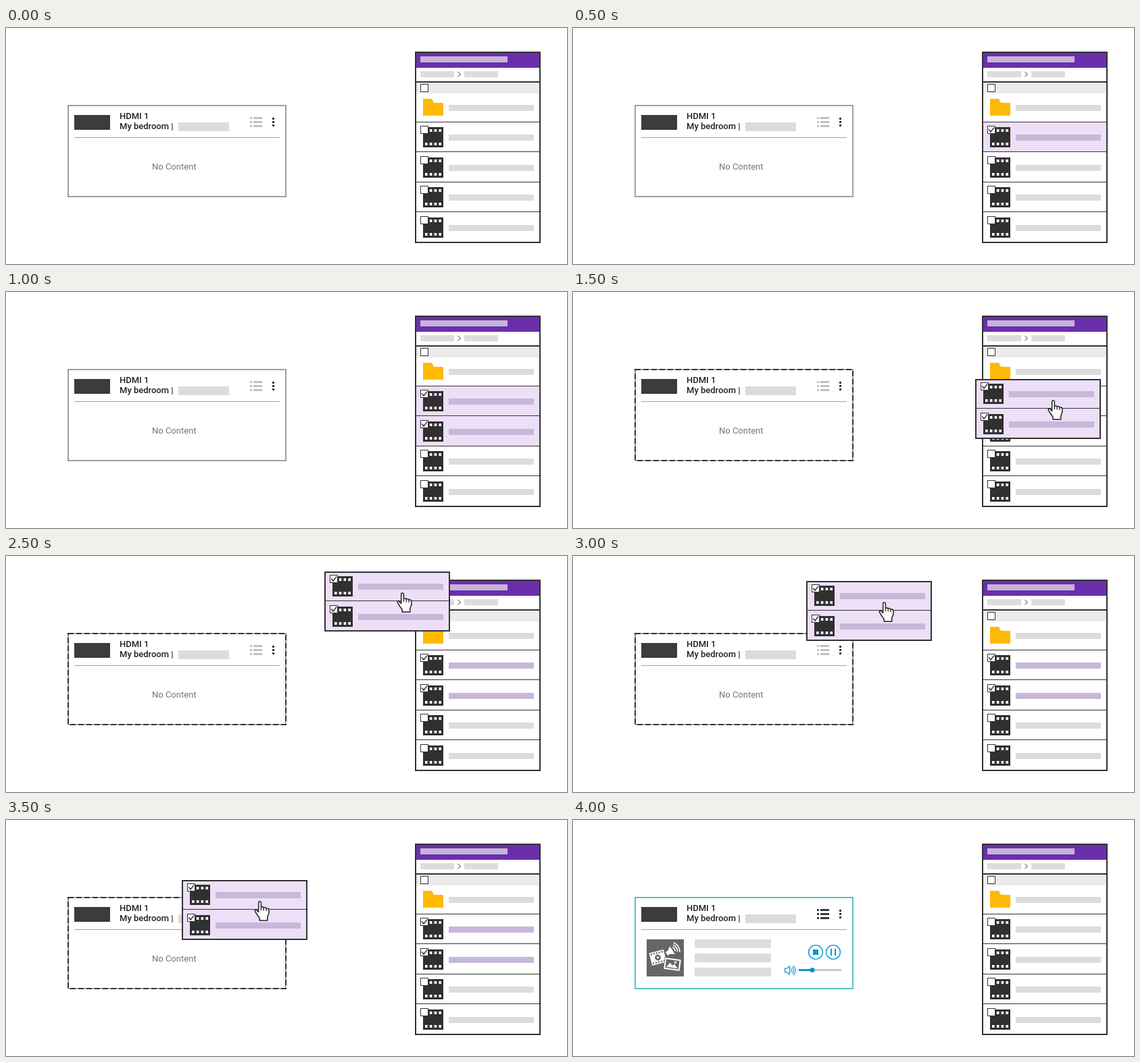
An HTML page for the animation above (6000 ms loop, 830 by 350 pixels).

```html
<!DOCTYPE html>
<html lang="en">
<head>
<meta charset="utf-8">
<title>Drag files to a display</title>
<style>
html, body { margin: 0; width: 100%; height: 100%; overflow: hidden; background: #fff; }
svg { display: block; width: 830px; height: 350px; }
text { font-family: Roboto, sans-serif; font-size: 13px; }
</style>
</head>
<body>
<svg id="stage" viewBox="0 0 830 350" xmlns="http://www.w3.org/2000/svg"></svg>
<script>
const DARK = '#333', GREY = '#dcdcdc', LILAC = '#ecdff7', MAUVE = '#c7b8d9', BLUE = '#0a96d2';
const STEP = 500, LOOP = 6000;

// Card position for each step from 1500 ms on
const PATH = [[595, 129], [554, 85], [471, 23], [345, 37], [260, 89]];

const rect = (x, y, w, h, fill, more = '') =>
  `<rect x="${x}" y="${y}" width="${w}" height="${h}" fill="${fill}" ${more}/>`;
const line = (d, color, w = 1, more = '') =>
  `<path d="${d}" fill="none" stroke="${color}" stroke-width="${w}" ${more}/>`;
const frame = (x, y, w, h, color, fill = 'none', more = '') =>
  rect(x + 1, y + 1, w - 2, h - 2, fill, `stroke="${color}" stroke-width="2" ${more}`);

function checkbox(x, y, on) {
  return rect(x + .5, y + .5, 11, 11, '#fff', `stroke="${DARK}"`) +
    (on ? line(`M${x + 2.3} ${y + 5.6}l2.8 3.4l5-6.6`, DARK, 1.5) : '');
}

function film(x, y) {
  let s = rect(x, y, 30, 30, '#303030');
  for (let i = 0; i < 4; i++)
    for (const dy of [3, 23]) s += rect(x + 3 + i * 6.8, y + dy, 3.6, 4, '#fff');
  return s;
}

const fileRow = (x, y, on) =>
  film(x, y) + checkbox(x - 4, y - 2, on) + rect(x + 38, y + 11, 126, 9, on ? MAUVE : GREY);

function fileList(picked, dragging) {
  let s = rect(607, 37, 182, 280, '#fff') + rect(607, 37, 182, 22, '#6b2fab') +
    rect(613, 42, 129, 9, '#c6b5da') +
    rect(613, 64, 50, 9, GREY) + rect(678, 64, 50, 9, GREY) +
    line('M668.5 65l4 3.6l-4 3.6', DARK) +
    rect(607, 81, 182, 16, '#ebebeb') + rect(607, 79, 182, 2, DARK) +
    checkbox(613, 83, false) +
    '<path d="M617 105H630L633 111H647V130H617Z" fill="#ffb905"/>' +
    rect(655, 114, 126, 9, GREY);
  [139, 183, 228, 272].forEach((y, i) => {
    const on = i < picked;
    if (on && !dragging) s += rect(607, y + 1, 182, 44, LILAC);
    s += rect(607, y, 182, 1, DARK) + fileRow(617, y + (i % 2 ? 9 : 8), on);
  });
  return s + frame(605, 35, 186, 284, DARK);
}

const HAND = 'M6.2 2.5Q6.2 .7 8 .7T9.9 2.5V9.2Q11.8 8 13.7 9.9Q16 8.9 17.6 11Q21.4 10.4 21.4 14' +
  'V18.5L19.3 23.5V29H7.6V25.2L4.4 21L.8 15.2Q.5 13 2.6 12.9L6.2 16.4Z';

function card([x, y]) {
  return `<g transform="translate(${x} ${y})">` + frame(0, 0, 186, 89, DARK, LILAC) +
    rect(1, 43, 184, 1, DARK) + fileRow(12, 7, true) + fileRow(12, 52, true) +
    '<g transform="translate(107.5 31)">' +
    `<path d="${HAND}" fill="#fff" stroke="#222" stroke-width="1.5" stroke-linejoin="round"/>` +
    line('M9.9 9V14M13.7 10V14.5M17.6 11V15', '#222', 1.3) + '</g></g>';
}

function listIcon(color) {
  return [132, 138, 144].map(y => rect(361, y, 3, 3, color) + rect(366, y, 13, 3, color)).join('');
}

function mediaThumb() {
  let s = rect(109, 177, 55, 55, '#666') +
    '<g transform="translate(125.5 204) rotate(-14)">' + rect(-11, -9.5, 22, 19, '#fff');
  for (let i = 0; i < 5; i++)
    for (const y of [-8, 5.6]) s += rect(-9.4 + i * 4.1, y, 2.2, 2.4, '#666');
  s += '<circle r="4.4" fill="#666"/><path d="M-1.3-2.3L2.6 0L-1.3 2.3Z" fill="#fff"/></g>';
  s += '<g transform="translate(147 193) rotate(-33)">' +
    '<path d="M-10-3H-6L0-7V7L-6 3H-10Z" fill="#fff"/>' +
    line('M2.5-3.5Q5 0 2.5 3.5M5-6Q9 0 5 6M7.5-8.5Q13 0 7.5 8.5', '#fff', 1.7) + '</g>';
  return s + '<g transform="translate(147 214) rotate(8)">' +
    rect(-12.5, -9.5, 25, 19, '#666') +
    rect(-10.8, -7.5, 21.6, 15, '#666', 'stroke="#fff" stroke-width="2"') +
    '<path d="M-8.5 5L-3.5-2L0 2L3-1L8.5 5Z" fill="#fff"/><circle cx="4" cy="-3.5" r="1.7" fill="#fff"/></g>';
}

function player() {
  const ring = x => `<circle cx="${x}" cy="196" r="10.4" fill="#fff" stroke="${BLUE}" stroke-width="1.4"/>`;
  return mediaThumb() + [177, 198, 219].map(y => rect(180, y, 113, 13, GREY)).join('') +
    ring(359) + rect(355, 192, 8, 8, BLUE) +
    ring(385) + rect(381, 191, 2, 10, BLUE) + rect(387, 191, 2, 10, BLUE) +
    line('M313.6 220.2H316.6L320.4 216.8V229.2L316.6 225.8H313.6Z', BLUE, 1.2) +
    line('M322.3 220Q324.6 223 322.3 226M324.4 217.8Q328 223 324.4 228.2M326.4 215.6Q331.4 223 326.4 230.4', BLUE, 1.2) +
    rect(334, 221, 63, 3, '#c8c8c8') + rect(334, 221, 20, 3, BLUE) +
    `<circle cx="354" cy="222.5" r="3.6" fill="${BLUE}"/>`;
}

function display(dragging, playing) {
  return frame(91, 114, 324, 137, playing ? '#5bbfcb' : '#a0a0a0', '#fff') +
    (dragging ? frame(91, 114, 324, 137, DARK, 'none', 'stroke-dasharray="8 4"') : '') +
    rect(101, 129, 53, 22, '#3c3c3c') +
    '<g fill="#212121" font-weight="500"><text x="168" y="135">HDMI 1</text>' +
    '<text x="168" y="150">My bedroom |</text></g>' +
    rect(255, 140, 75, 13, GREY) + listIcon(playing ? '#333840' : '#bfbfbf') +
    [133, 138, 143].map(y => rect(394, y, 3, 3, DARK)).join('') +
    rect(101, 162, 304, 1, '#a0a0a0') +
    (playing ? player() : '<text x="216" y="210" fill="#757575">No Content</text>');
}

function scene(step) {
  const playing = step >= 8, dragging = step >= 3 && !playing;
  const picked = playing ? 0 : Math.min(step, 2);
  return display(dragging, playing) + fileList(picked, dragging) +
    (dragging ? card(PATH[step - 3]) : '');
}

const stage = document.getElementById('stage');
const start = performance.now();
let shown = -1;

function draw(now) {
  const step = Math.min(8, Math.floor((Math.max(0, now - start) % LOOP) / STEP));
  if (step !== shown) stage.innerHTML = scene(shown = step);
  requestAnimationFrame(draw);
}
draw(start);
</script>
</body>
</html>
```
